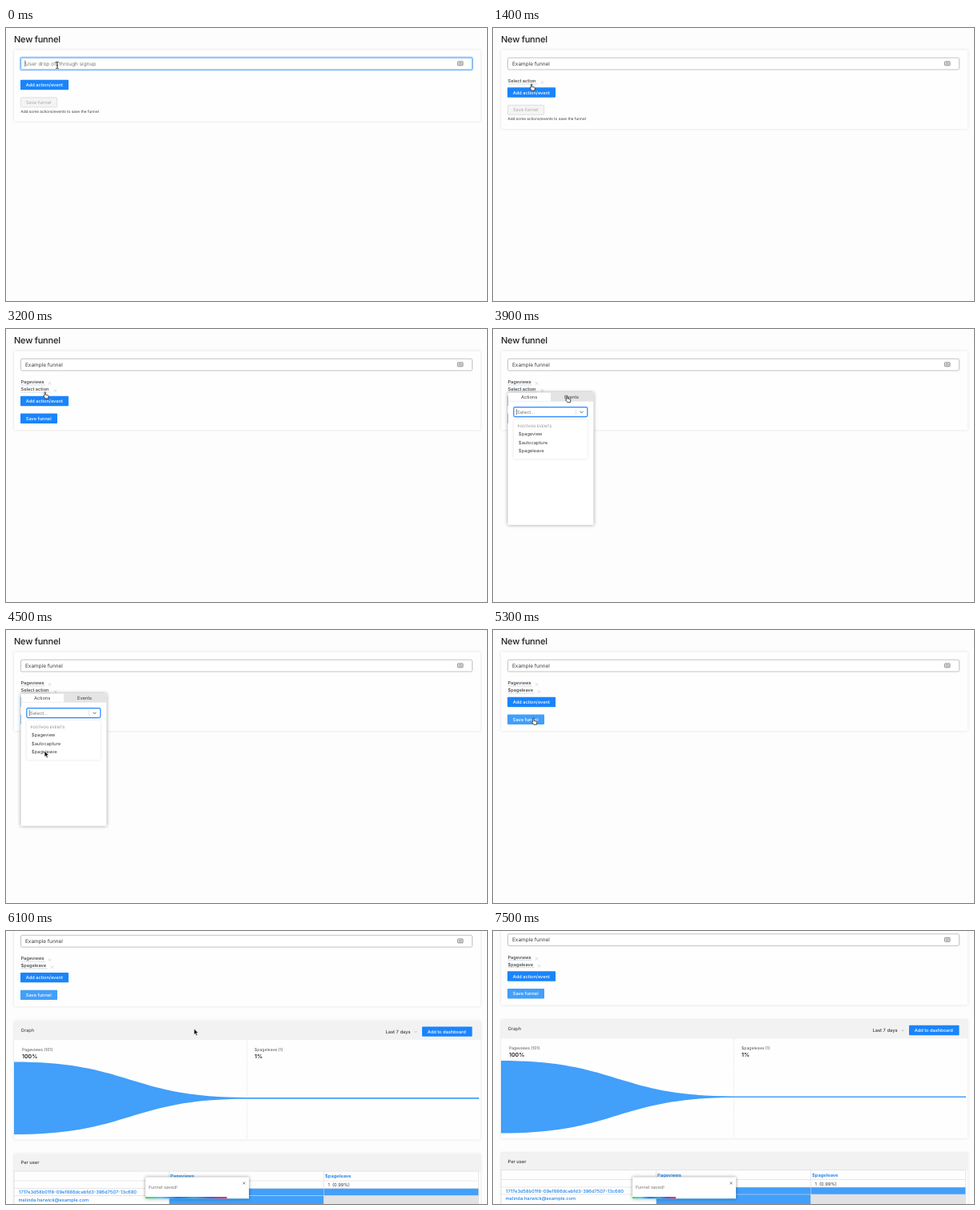
Animation, 600 px wide and 341 px high, one loop 7.6 s. Source, as an HTML page:

```html
<!DOCTYPE html>
<html lang="en">
<head>
<meta charset="utf-8">
<title>New funnel</title>
<style>
html, body { margin: 0; height: 100%; overflow: hidden; background: #fdfdfd; }
svg { display: block; width: 100vw; height: 100vh; }
text { font-family: Inter, "Open Sans", sans-serif; text-rendering: geometricPrecision; white-space: pre; }
.card { filter: drop-shadow(0 .5px 1.5px rgba(0,0,0,.13)); }
.pop { filter: drop-shadow(0 .5px 2px rgba(0,0,0,.4)); }
</style>
</head>
<body>
<svg id="stage" viewBox="0 0 600 341" preserveAspectRatio="none"></svg>
<script>
const LOOP = 7600, STEP = 100;
const BLUE = '#1a84fb', LIGHT = '#429ffa', INK = '#3c3c3c';
const NAME = 'Example funnel';
const TIME = { type: 100, add1: 1400, open1: 1800, tip: 2300, pick1: 2600, add2: 3100,
  open2: 3400, events: 3800, pick2: 4600, saved: 5500, loaded: 5700, scroll: 5600 };

// Pointer stops: time, x, y
const STOPS = [[0, 64, 46], [800, 64, 46], [1200, 48, 70], [1500, 48, 70], [1700, 45, 65],
  [1900, 45, 65], [2300, 50.5, 166], [2600, 50.5, 166], [3000, 50, 80], [3150, 50, 80],
  [3300, 45, 75], [3450, 45, 75], [3800, 92.5, 83.5], [4100, 92.5, 83.5], [4500, 48, 151],
  [4650, 48, 151], [5100, 50.5, 110], [5600, 50.5, 110], [6000, 234.5, 122], [LOOP, 234.5, 122]];

const rect = (x, y, w, h, fill, more = '') =>
  `<rect x="${x}" y="${y}" width="${w}" height="${h}" fill="${fill}" ${more}/>`;
const path = (d, stroke, width = .6, more = '') =>
  `<path d="${d}" fill="none" stroke="${stroke}" stroke-width="${width}" ${more}/>`;
// y is the middle of the capitals
const text = (x, y, s, size = 5.7, fill = INK, weight = 400, more = '') =>
  `<text x="${x}" y="${y + size * .36}" font-size="${size}" fill="${fill}" font-weight="${weight}" ${more}>${s}</text>`;
const cross = (x, y, r, color) =>
  path(`M${x - r} ${y - r}l${2 * r} ${2 * r}m0 ${-2 * r}l${-2 * r} ${2 * r}`, color);
const chevron = (x, y, r, color, width) =>
  path(`M${x - r} ${y - r / 2}l${r} ${r} ${r} ${-r}`, color, width);
const button = (x, y, w, label, fill = BLUE) =>
  rect(x, y - 6.2, w, 12.4, fill, 'rx=".8"') + text(x + 6.8, y, label, 5.65, '#fff', 500);

function nameField(t) {
  const focused = t < TIME.add1;
  const typed = NAME.slice(0, Math.max(0, Math.floor((t - TIME.type) / 50)));
  let out = focused ? rect(17.4, 36.2, 565, 16.6, 'none', 'rx="2" stroke="#bcdcff" stroke-width="1.6"') : '';
  out += rect(18.5, 37.2, 563, 14.8, '#fff', `rx="1.6" stroke="${focused ? '#4a9cf6' : '#bdbdbd'}" stroke-width=".9"`);
  out += typed ? text(24, 44.5, typed, 6.45) : text(24, 44.5, 'User drop off through signup', 6.45, '#777');
  if (!typed) out += rect(23.6, 40.5, .6, 8, '#222');
  return out + rect(563.5, 41.8, 6.5, 5, '#eee', 'rx=".6" stroke="#777" stroke-width=".8"') +
    path('M565 43.5h2m-2 1.6h2m1-2.2v3', '#777', .7);
}

function step(y, label, width) {
  return text(18.5, y, label, 5.65, INK, 500) +
    path(`M18.5 ${y + 3.9}h${width}`, '#6f9ccb', .5, 'stroke-dasharray="1 .6"') +
    cross(24.5 + width, y + 2, 1.7, '#c4c4c4');
}

function editor(t) {
  const rows = (t >= TIME.add1) + (t >= TIME.add2);
  const ready = t >= TIME.pick1;
  const shift = rows * 9.5;
  let out = rect(10, 27.5, 582, (ready ? 79.5 : 89) + shift, '#fefefe', 'class="card"') + nameField(t);
  if (rows) out += ready ? step(66, 'Pageviews', 30) : step(66, 'Select action', 37);
  if (rows > 1) out += t >= TIME.pick2 ? step(75, '$pageleave', 33) : step(75, 'Select action', 37);
  out += button(18, 71 + shift, 60, 'Add action/event');
  if (ready) return out + button(18, 92.8 + shift, 46, 'Save funnel', t >= 5000 ? LIGHT : BLUE);
  return out + rect(18.4, 86.8 + shift, 45.2, 12, '#f4f4f4', 'rx=".8" stroke="#d4d4d4" stroke-width=".7"') +
    text(25, 92.8 + shift, 'Save funnel', 5.65, '#aaa') +
    text(18.5, 104 + shift, 'Add some actions/events to save the funnel', 4.72);
}

function picker(t, top) {
  const events = t >= TIME.events;
  const group = (y, s) => text(30.5, y, s, 4.65, '#999', 500);
  const item = (y, s) => text(32, y, s);
  const hover = !events && t >= TIME.tip && t < TIME.pick1;
  let out = rect(18.5, 0, 107, 165.5, '#fff', 'class="pop"') +
    rect(events ? 72 : 18.5, 0, 53.5, 11, '#e4e4e4') + path('M18.5 11h107', '#ddd', .5) +
    text(35, 5.7, 'Actions') + text(89, 5.7, 'Events') +
    rect(25.8, 18.3, 92, 12, '#fff', 'rx="1.8" stroke="#2684ff" stroke-width="1.2"') +
    text(30, 24.4, 'Select...', 5.8, '#777') + rect(29.3, 20.5, .5, 7.5, '#222') +
    path('M103.5 21v7', '#ccc', .5) + chevron(110.5, 24.5, 2, '#555', 1) +
    rect(25.8, 34, 92, events ? 49 : 75, '#fff', 'rx="1.5" class="card"');
  if (events) {
    out += group(42, 'POSTHOG EVENTS') + item(52, '$pageview') + item(62.5, '$autocapture') + item(73, '$pageleave');
  } else {
    if (hover) out += rect(25.8, 93, 92, 10.5, '#d3e2f8');
    out += group(42, 'AUTOCAPTURE') + item(52.4, 'ElkReel paid') + item(62.6, 'ElkReel signed up') +
      group(77.7, 'PAGEVIEW') + item(87.7, 'ElkReel homepage view') + item(98.1, 'Pageviews');
  }
  if (hover) out += rect(118.5, 87.5, 58.5, 51, '#fff', 'class="pop"') + text(125, 99, 'Pageviews') +
    path('M126 107h43m-43 25h43', '#eee', .7) + text(133.5, 119.5, 'Pageview', 5.75, '#333', 700);
  return `<g transform="translate(0 ${top})">${out}</g>`;
}

function graph() {
  const stat = (x, label, value) => text(x, 180, label, 5.1, '#555') + text(x, 188.3, value, 7, '#222', 600);
  return rect(10, 144.5, 582, 148, '#fefefe', 'class="card"') + rect(10, 144.5, 582, 23.5, '#f2f2f2') +
    text(18.5, 155.5, 'Graph', 5.8) + text(473.5, 157.5, 'Last 7 days', 5.75, INK, 500) +
    chevron(511, 157.8, 1.5, '#999', .6) + button(519, 157.5, 62.5, 'Add to dashboard') +
    path('M300.5 168v124', '#ddd', .6, 'stroke-dasharray="2 1"') +
    stat(20, 'Pageviews (101)', '100%') + stat(310, '$pageleave (1)', '1%') +
    `<path fill="${LIGHT}" d="M10 195.5C155 195.5 155 239.9 300 239.9H590V241.6H300C155 241.6 155 286 10 286Z"/>`;
}

function users(t) {
  const link = (x, y, s, weight = 500) => text(x, y, s, 5.75, '#1a80ea', weight);
  let out = rect(10, 310.5, 582, 80, '#fefefe', 'class="card"') + rect(10, 310.5, 582, 21.5, '#f2f2f2') +
    text(18.5, 321, 'Per user', 5.75, INK, 500) +
    rect(203.5, 353.5, 386, 9, LIGHT) + rect(203.5, 362.5, 193, 28, LIGHT) + rect(396.5, 362.5, 193, 28, '#e2e2e4') +
    path('M10 332h579.5M10 344h579.5M10 353.5h579.5M10 362.5h579.5M10.3 332v50M203.5 332v50M396.5 332v50M589.5 332v50', '#d8d8d8', .6) +
    link(205, 338.3, 'Pageviews', 600) + link(398, 338.3, '$pageleave', 600) +
    text(205, 349, '101  (100%)') + text(401.5, 349, '1  (0.99%)') +
    link(16, 358, '1717e3d58b01f8-09ef886dcebfd3-396d7507-13c680') + link(15.5, 367.5, 'melinda.harwick@example.com');
  if (t < TIME.loaded) out += rect(10, 312, 582, 80, '#000', 'opacity=".36"') +
    path('M294.8 339A5.8 5.8 0 0 1 305 339.5m.8-3.2v3.6h-3.6', '#222', 1.2);
  return out;
}

function toast(t) {
  const width = 122 - (t - TIME.saved) * .034;
  return rect(174, 307.5, 129, 26.7, '#fff', 'class="pop" rx=".5"') +
    text(178, 320.5, 'Funnel saved!', 5.5, '#777') + cross(297, 315, 1.5, '#555') +
    rect(174, 332, width, 2.2, 'url(#bar)');
}

function pointer(t) {
  if (t > 6600) return '';
  const i = STOPS.findIndex(s => s[0] > t);
  const [t0, x0, y0] = STOPS[i - 1], [t1, x1, y1] = STOPS[i];
  const p = (t - t0) / (t1 - t0), e = p * p * (3 - 2 * p);
  const within = (a, b) => t >= a && t < b;
  let shape = '<path d="M0 0v7.6l1.7-1.6 1.2 2.7 1.4-.6-1.2-2.6h2.4z" fill="#111" stroke="#fff" stroke-width=".6"/>';
  if (t < 900) {
    shape = path('M-1.7-3.8q1.7 0 1.7 1v6.4q0 1-1.7 1M1.7-3.8q-1.7 0-1.7 1m0 6.4q0 1 1.7 1M-1 .8h2', '#222', .9);
  } else if (within(1100, 2000) || within(2900, 3500) || within(3700, 4200) || within(5000, 5700)) {
    shape = '<path d="M-.7.7C-.7-.3.7-.3.7.7V3.4l2.7.6c.8.2 1 .7.9 1.4L3.8 8.2H.4L-1.7 5.4c-.5-.8.4-1.3 1-.7z" fill="#fff" stroke="#222" stroke-width=".8"/>';
  }
  return `<g transform="translate(${x0 + (x1 - x0) * e} ${y0 + (y1 - y0) * e})">${shape}</g>`;
}

const stops = ['#4cd964', '#5ac8fa', '#007aff', '#34aadc', '#5856d6', '#ff2d55']
  .map((c, i) => `<stop offset="${i / 5}" stop-color="${c}"/>`).join('');
const defs = `<defs><linearGradient id="bar">${stops}</linearGradient></defs>`;

function scene(t) {
  const saved = t >= TIME.saved;
  const scroll = t > TIME.scroll ? 33.5 * (1 - Math.exp((TIME.scroll - t) / 164)) : 0;
  const title = saved ? 'Funnel: ' + NAME : 'New funnel';
  let page = text(10, 14.3, title, 11, '#222', 500, 'letter-spacing="-.22"') + editor(t);
  if (saved) page += graph() + users(t);
  if (t >= TIME.open1 && t < TIME.pick1) page += picker(t, 70);
  if (t >= TIME.open2 && t < TIME.pick2) page += picker(t, 79.3);
  return defs + rect(0, 0, 600, 341, '#fdfdfd') + `<g transform="translate(0 ${-scroll})">${page}</g>` +
    (saved ? toast(t) : '') + pointer(t);
}

const stage = document.getElementById('stage');
const start = performance.now();
let shown = -1;
function tick() {
  const t = Math.floor((performance.now() - start) % LOOP / STEP) * STEP;
  if (t !== shown) stage.innerHTML = scene(shown = t);
  requestAnimationFrame(tick);
}
tick();
</script>
</body>
</html>
```
